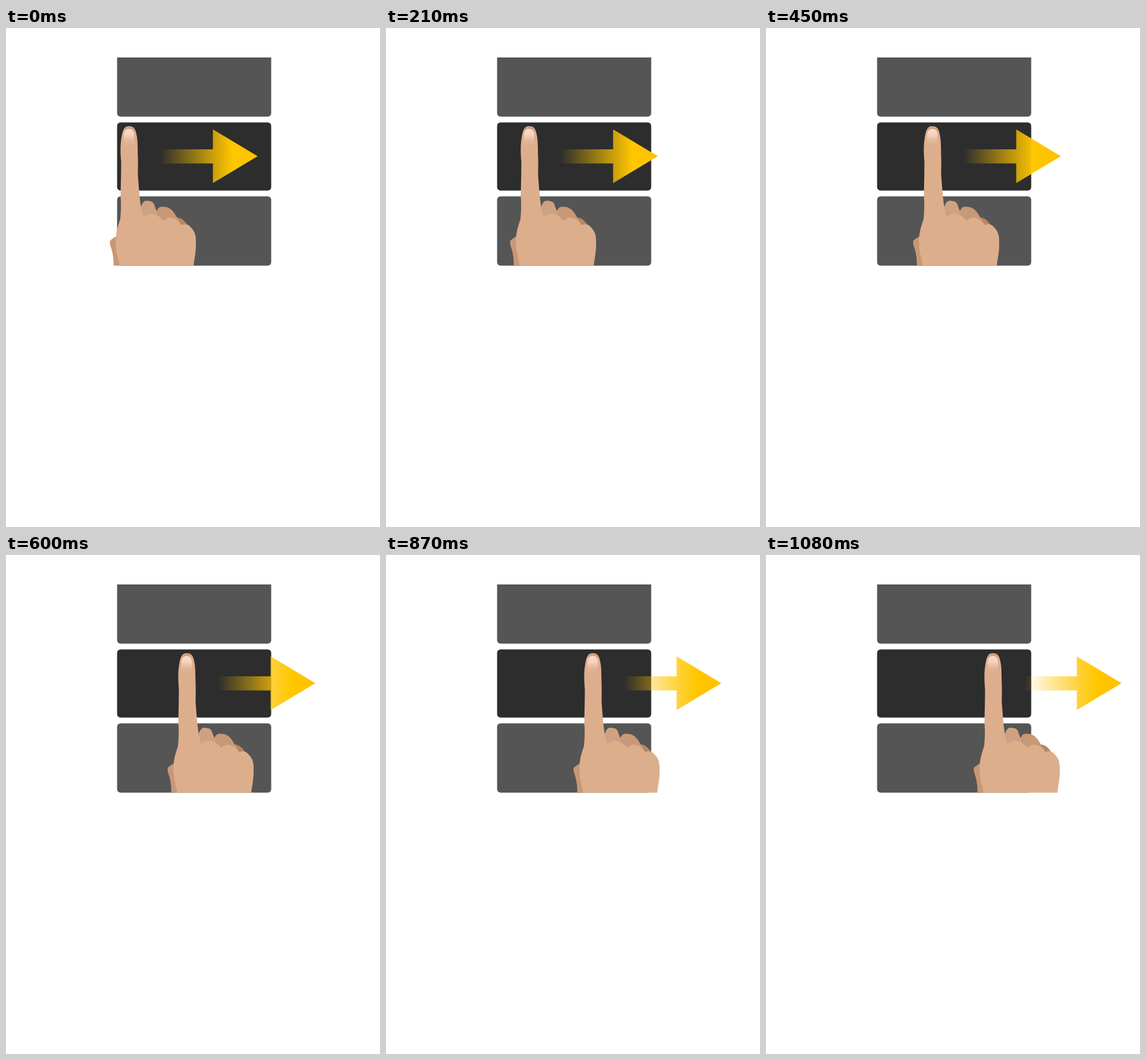
Recreate the animation shown at these times as an HTML page with a canvas. Size 648 by 864 pixels, loop 1180 ms.

```html
<!DOCTYPE html>
<html lang="en">
<head>
<meta charset="utf-8">
<title>Swipe right</title>
<style>
  html, body { margin: 0; width: 100%; height: 100%; overflow: hidden; background: #fff; }
  canvas { display: block; }
</style>
</head>
<body>
<canvas id="stage" width="648" height="864"></canvas>
<script>
const ctx = document.getElementById('stage').getContext('2d');
const LOOP = 1180, STEP = 30, STEPS = 36, SHIFT = 5;
const BOTTOM = 411.5;

// Shapes are placed for the start of the swipe.
const thumb = new Path2D(`M180 369 Q184 364 193 360 L204 412 H186.5
  Q186.5 394 182.5 382 Q179.5 374 180 369 Z`);
const middle = new Path2D(`M232 316 C235 305 238 298.5 244 299
  C252 299.5 256 301 257.5 308 Q259 313 262 319 L264 334 L238 334 Z`);
const ring = new Path2D(`M259 323 C262 314 264 309.5 270 309.5
  C283 309 289 315 295 326 L304 341 L270 342 Z`);
const little = new Path2D('M292 328 Q303 326 313 339 L306 346 L292 336 Z');
const palm = new Path2D(`M197 412 C193 395 190 383 190 367
  C191 351 194 343 198 331 C199 319 200 308 198.5 291
  C199 273 199.5 251 199.5 232 C198 214 198 200 200.5 187
  C203 174 206 170 213 170 C221 170 224 174 226 184
  C228.5 194 228 207 228.5 222 C229 235 228.5 246 228.5 255
  C230.5 276 231 304 238 328 C242 325 245 322 250 321.5
  C259 321 267 327 273 334 C277 330 281 328 286 328.5
  C295 330 300 335 304 341.5 C311 338 316 340 320 345
  C326 351 328.5 356 329 367 C329.5 389 327 394 325 412 Z`);
const tip = new Path2D(`M203.5 183 C205 174 207 171 213 171
  C219 171 222 174 223.5 183 C221 175 218 174 213 174 C208 174 205 176 203.5 183 Z`);
const nail = new Path2D(`M204 206 V185 C204.5 178 208 175 213 175
  C218 175 221.5 178 222 185 V206 Z`);
const arrow = new Path2D('M266 210 H358.5 V175.5 L436 222 L358.5 268.5 V234.5 H266 Z');

function fade(x0, y0, x1, y1, stops) {
  const g = ctx.createLinearGradient(x0, y0, x1, y1);
  for (const [at, color] of stops) g.addColorStop(at, color);
  return g;
}

const gold = fade(267, 0, 436, 0, [
  [0, 'rgba(255,196,0,0)'],
  [0.54, 'rgba(255,196,0,.75)'],
  [0.74, 'rgb(255,199,0)'],
  [1, 'rgb(255,192,0)']
]);
const gloss = fade(0, 175, 0, 206, [
  [0, 'rgba(251,221,204,1)'],
  [0.35, 'rgba(247,213,193,.9)'],
  [1, 'rgba(221,174,140,0)']
]);

function fill(path, color) {
  ctx.fillStyle = color;
  ctx.fill(path);
}

function panel(top, bottom, color, radii) {
  ctx.fillStyle = color;
  ctx.beginPath();
  ctx.roundRect(192.5, top, 267, bottom - top, radii);
  ctx.fill();
}

function drawHand() {
  fill(thumb, '#c79877');
  fill(little, '#b88763');
  fill(ring, '#c89977');
  fill(middle, '#cfa183');
  fill(palm, '#ddae8c');
  fill(tip, '#cf9e7c');
  fill(nail, gloss);
}

function draw(time) {
  const step = Math.min(STEPS, Math.floor(time % LOOP / STEP));
  ctx.fillStyle = '#fff';
  ctx.fillRect(0, 0, 648, 864);

  panel(51, 153.5, '#555', [0, 0, 6, 6]);
  panel(163.5, 281.5, '#2d2d2d', 6);
  panel(291.5, BOTTOM, '#555', 6);

  ctx.save();
  ctx.beginPath();
  ctx.rect(0, 0, 648, BOTTOM);
  ctx.clip();
  ctx.translate(step * SHIFT, 0);
  fill(arrow, gold);
  drawHand();
  ctx.restore();
}

const start = performance.now();
function tick() {
  draw(performance.now() - start);
  requestAnimationFrame(tick);
}
tick();
</script>
</body>
</html>
```
